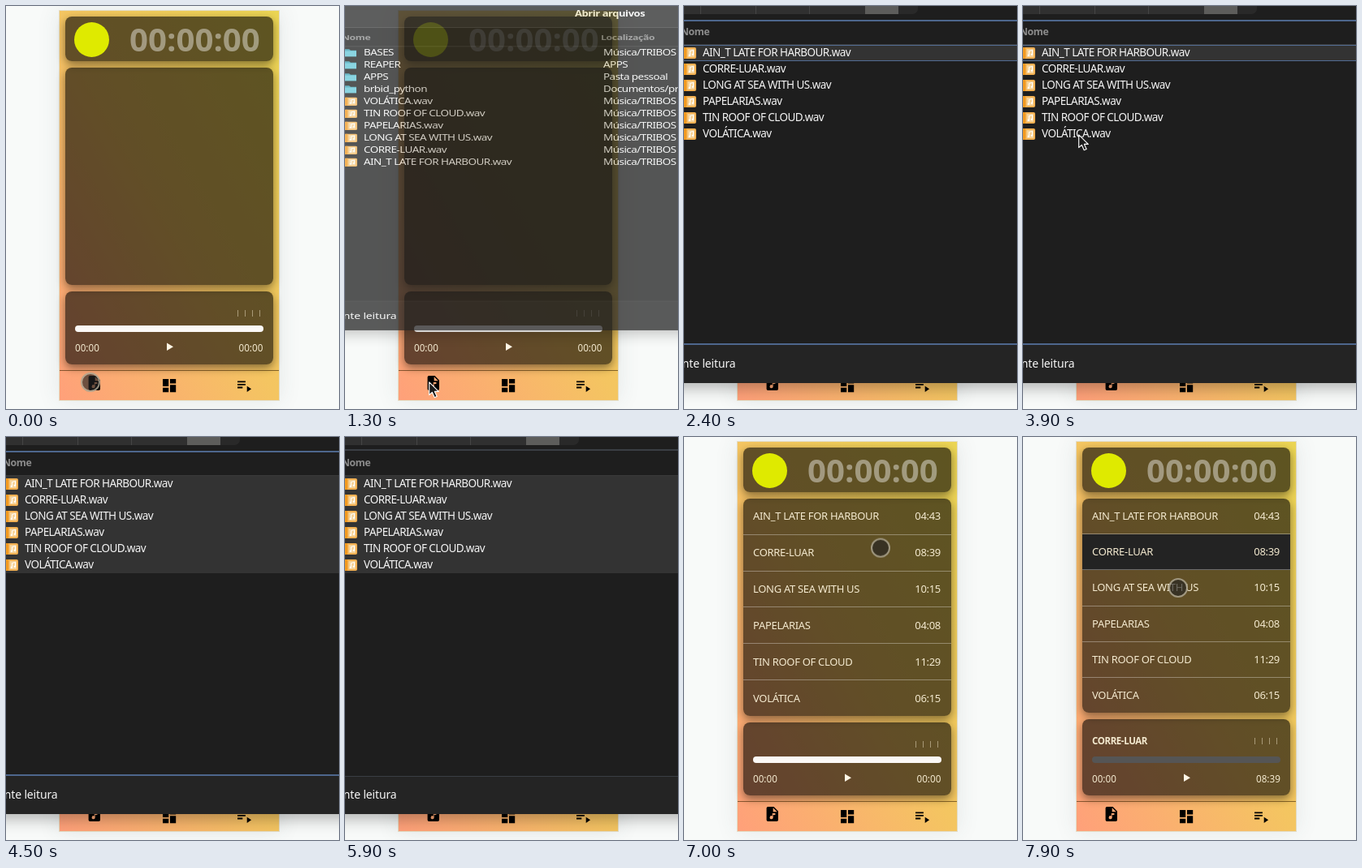
An HTML page that plays this animation: 410x497 px, repeating every 8 s.

```html
<!DOCTYPE html>
<html lang="pt-BR">
<head>
<meta charset="utf-8">
<title>Player</title>
<style>
  html, body { margin: 0; width: 100%; height: 100%; overflow: hidden; }
  body { position: relative; background: #f8faf9; color: #f4ead0; font: 13px "Noto Sans", "Open Sans", sans-serif; }
  div, svg, span { position: absolute; box-sizing: border-box; white-space: nowrap; }
  .anim { animation: 8s step-end infinite; }

  /* player app */
  .app {
    left: 65px; top: 5px; width: 272px; height: 482px; border: 1px solid #e3dcc4;
    background: linear-gradient(to top right, #ffa07a, #f4c561 50%, #ebd553);
    box-shadow: 0 0 26px rgba(60, 80, 80, .1);
  }
  .panel {
    left: 73px; width: 256px; border-radius: 8px; overflow: hidden;
    background: rgba(0, 0, 0, .6); box-shadow: 0 4px 11px rgba(0, 0, 0, .46);
  }
  .top { top: 13px; height: 55px; }
  .logo { left: 84px; top: 20px; width: 43px; height: 43px; border-radius: 50%; background: #dfea00; }
  .clock { left: 152px; top: 13px; font: bold 40.2px/55px "Noto Sans", sans-serif; color: rgba(255, 255, 255, .42); }
  .list { top: 76px; height: 268px; animation-name: list; }
  .tracks { inset: 0; display: flex; flex-direction: column; animation-name: tracks; }
  .tracks div {
    position: relative; flex: 1; display: flex; align-items: center; justify-content: space-between;
    padding: 0 13px 1px 12px; letter-spacing: -.3px; border-bottom: 1px solid rgba(255, 255, 255, .33);
  }
  .tracks div:last-child { border: 0; }
  .tracks span { position: static; }
  .tracks .pick { animation: pick 8s step-end infinite; }
  .player { top: 352px; height: 90px; animation-name: player; }
  .name { left: 12px; top: 18px; font: bold 11.5px/18px "Noto Sans", sans-serif; letter-spacing: -.4px; }
  .ticks {
    left: 212px; top: 23px; width: 28px; height: 8px; opacity: .45;
    background: repeating-linear-gradient(90deg, #fff4da 0 1px, transparent 1px 9px);
  }
  .bar { left: 85px; top: 394px; width: 232px; height: 8px; border-radius: 4px; background: #fbf8f6; animation-name: bar; }
  .time { top: 412px; font-size: 11.7px; line-height: 18px; }
  .chosen { visibility: hidden; animation-name: chosen; }
  .empty { animation-name: replaced; }
  .nav { left: 66px; top: 449px; width: 270px; height: 1px; background: rgba(60, 35, 0, .6); }
  .icons { left: 0; top: 0; }

  /* file dialog */
  .dialog {
    left: -200px; top: -80px; width: 800px; height: 545px; color: #f5f5f5; background: #1e1e1e;
    box-shadow: 0 4px 20px rgba(0, 0, 0, .34); transform-origin: 0 284px; visibility: hidden;
    font-size: 13.5px; letter-spacing: -.55px; animation-name: dialog;
  }
  .view { left: 200px; top: 80px; width: 410px; height: 385px; }
  .recent { animation-name: recent; }
  .folder { visibility: hidden; animation-name: folder; }
  .head { font-weight: bold; font-size: 12.3px; line-height: 20px; letter-spacing: -.4px; color: #8b8b8b; }
  .title { left: 0; top: -80px; width: 410px; height: 48px; background: #2a2a2a; border-bottom: 1px solid #464646; }
  .title span { left: 283px; top: 14px; font-weight: bold; font-size: 13px; line-height: 20px; letter-spacing: -.45px; }
  .row { left: 0; width: 410px; height: 20px; line-height: 19px; }
  .row span { left: 23px; top: 0; }
  .row .place { left: 318px; }
  .song, .dir { left: 0; top: 3px; width: 15px; height: 14px; }
  .folder .row { animation: select 8s step-end infinite; }
  .folder .row.focus {
    background: #333; box-shadow: inset 0 1px #526c93, inset 0 -1px #526c93; animation-name: unfocus;
  }
  .path {
    left: 0; top: -14px; width: 288px; height: 24px; border-radius: 0 0 7px 0;
    background: linear-gradient(90deg, #303030 20px, #454545 20px 21px, #303030 21px 88px, #454545 88px 89px,
      #303030 89px 154px, #454545 154px 155px, #303030 155px 223px, #5d5d5b 223px 264px, #292929 264px);
  }
  .pane { left: -2px; top: 17px; width: 420px; height: 401px; border: solid #4d668d; border-width: 2px 0; animation-name: pane; }
  .rule { left: 0; top: 47px; width: 410px; height: 1px; background: #3a3a3a; }
  .foot { left: 200px; top: 498px; width: 410px; height: 47px; background: #242424; }
  .foot span { left: -10px; top: 13px; font-size: 14px; line-height: 20px; letter-spacing: -.15px; }

  /* pointers */
  .touch {
    left: -12px; top: -12px; width: 24px; height: 24px; border-radius: 50%;
    background: rgba(35, 35, 35, .66); border: 2px solid rgba(235, 225, 195, .58); animation-name: touch;
  }
  .arrow { left: 0; top: 0; visibility: hidden; animation-name: arrow; }

  @keyframes dialog {
    16.25% { visibility: visible; transform: scaleY(.75); opacity: .75; }
    17.5% { visibility: visible; transform: scaleY(.95); opacity: .95; }
    18.75%, 73.75% { visibility: visible; transform: none; opacity: 1; }
    75% { visibility: visible; transform: scaleY(.5); opacity: .5; }
    76.25%, 100% { visibility: hidden; }
  }
  @keyframes recent { 30%, 100% { visibility: hidden; } }
  @keyframes folder { 30% { visibility: inherit; } 76.25%, 100% { visibility: hidden; } }
  @keyframes select { 51.25%, 100% { background: #333; } }
  @keyframes unfocus { 51.25%, 100% { box-shadow: none; } }
  @keyframes pane { 73.75%, 100% { top: 15px; height: 404px; border-width: 2px 0 1px; border-color: #3a3e44; } }
  @keyframes tracks { 0% { visibility: hidden; } 77.5%, 100% { visibility: visible; } }
  @keyframes pick { 93.75%, 100% { background: #232323; } }
  @keyframes list { 93.75%, 100% { height: 264px; } }
  @keyframes player { 93.75%, 100% { top: 348px; height: 94px; } }
  @keyframes bar { 93.75%, 100% { background: #555; } }
  @keyframes chosen { 93.75%, 100% { visibility: visible; } }
  @keyframes replaced { 93.75%, 100% { visibility: hidden; } }
  @keyframes touch {
    0% { transform: translate(104px, 464px); }
    16.25% { visibility: hidden; }
    85% { visibility: visible; transform: translate(312px, 140px); animation-timing-function: steps(3); }
    88.75% { visibility: visible; transform: translate(207px, 135px); }
    93.75% { visibility: visible; transform: translate(207px, 135px); animation-timing-function: steps(4); }
    98.75%, 100% { visibility: visible; transform: translate(191px, 186px); }
  }
  @keyframes arrow {
    16.25% { visibility: visible; transform: translate(103px, 463px); animation-timing-function: steps(3); }
    20% { visibility: hidden; transform: translate(-20px, 300px); }
    35% { visibility: visible; transform: translate(51px, 114px); animation-timing-function: steps(6); }
    42.5% { visibility: visible; transform: translate(62px, 168px); }
    48.75% { visibility: visible; transform: translate(68px, 158px); }
    55% { visibility: visible; transform: translate(82px, 147px); }
    56.25%, 100% { visibility: hidden; }
  }
</style>
</head>
<body>
  <div class="app"></div>
  <div class="panel top"></div>
  <div class="logo"></div>
  <div class="clock">00:00:00</div>
  <div class="panel list anim"><div class="tracks anim"></div></div>
  <div class="panel player anim">
    <span class="name chosen anim">CORRE-LUAR</span>
    <div class="ticks"></div>
  </div>
  <div class="bar anim"></div>
  <span class="time" style="left:85px">00:00</span>
  <span class="time empty anim" style="left:286.5px">00:00</span>
  <span class="time chosen anim" style="left:287px">08:39</span>
  <div class="nav"></div>
  <svg class="icons" width="410" height="497">
    <path d="M198 415.5l8 4.7-8 4.7z" fill="#fff6e6"/>
    <path transform="translate(98 454.2) scale(.9)" fill-rule="evenodd" d="M14 2H6Q4 2 4 4V20Q4 22 6 22H18Q20 22 20 20V8zM16 13H13V16.8A2.25 2.25 0 1 1 12 14.9V11H16zM13 9V3.5L18.5 9z"/>
    <path transform="translate(190.3 457.3) scale(.9)" d="M3 13h8V3H3zM3 21h8v-6H3zM13 21h8V11h-8zM13 3v6h8V3z"/>
    <path transform="translate(282.3 457) scale(.9)" d="M3 10h11v2H3zM3 6h11v2H3zM3 14h7v2H3zM16 13v8l6-4z"/>
  </svg>

  <div class="dialog anim">
    <div class="view recent anim">
      <div class="title"><span>Abrir arquivos</span></div>
      <span class="head" style="left:-4px;top:-26px">Nome</span>
      <span class="head" style="left:315px;top:-26px">Localização</span>
      <div class="rule" style="top:-2px"></div>
      <div class="rule" style="top:417px"></div>
    </div>
    <div class="foot"><span>ente leitura</span></div>
    <div class="view folder anim">
      <div class="path"></div>
      <div class="pane anim"></div>
      <span class="head" style="left:-4px;top:22px">Nome</span>
      <div class="rule"></div>
    </div>
  </div>

  <svg class="arrow anim" width="14" height="21" overflow="visible">
    <path d="M.7.8V16.6L4.3 13.3 7.2 19.7 10.2 18.4 7.4 12.4H12.3z" fill="#1c1c1c" stroke="#fff" stroke-width="1.1" stroke-linejoin="round"/>
  </svg>
  <div class="touch anim"></div>

<script>
  const songs = [
    ['AIN_T LATE FOR HARBOUR', '04:43'],
    ['CORRE-LUAR', '08:39'],
    ['LONG AT SEA WITH US', '10:15'],
    ['PAPELARIAS', '04:08'],
    ['TIN ROOF OF CLOUD', '11:29'],
    ['VOLÁTICA', '06:15'],
  ];
  const folders = [
    ['BASES', 'Música/TRIBOS'],
    ['REAPER', 'APPS'],
    ['APPS', 'Pasta pessoal'],
    ['brbid_python', 'Documentos/projetos'],
  ];
  const icons = {
    song: '<svg class="song" viewBox="0 0 15 14"><rect width="15" height="14" rx="2" fill="#f2b052"/>' +
      '<path d="M0 0h3v14H0z" fill="#f39a1f"/><rect x="4.5" y="2" width="8.5" height="10" fill="#f7d49a"/>' +
      '<path d="M7.5 9.5V4.5l4-1v5" fill="none" stroke="#fff"/><path d="M5.8 8.7h2.2v2H5.8zM9.7 7.7h2.2v2H9.7z" fill="#fff"/></svg>',
    dir: '<svg class="dir" viewBox="0 0 15 14"><path d="M0 1h5l2 2h7v10H0z" fill="#3fa3b8"/><path d="M0 4h14v9H0z" fill="#66c7d8"/></svg>',
  };

  const add = (selector, html) => document.querySelector(selector).insertAdjacentHTML('beforeend', html);
  const row = (icon, y, name, place = '', cls = '') =>
    `<div class="row ${cls}" style="top:${y}px">${icons[icon]}<span>${name}</span><span class="place">${place}</span></div>`;

  songs.forEach(([name, time], i) => {
    add('.tracks', `<div class="${i === 1 ? 'pick' : ''}"><span>${name}</span><span>${time}</span></div>`);
    add('.folder', row('song', 48 + 20 * i, name + '.wav', '', i ? '' : 'focus'));
    add('.recent', row('song', -1 + 20 * (9 - i), name + '.wav', 'Música/TRIBOS'));
  });
  folders.forEach(([name, place], i) => add('.recent', row('dir', -1 + 20 * i, name, place)));
</script>
</body>
</html>
```
